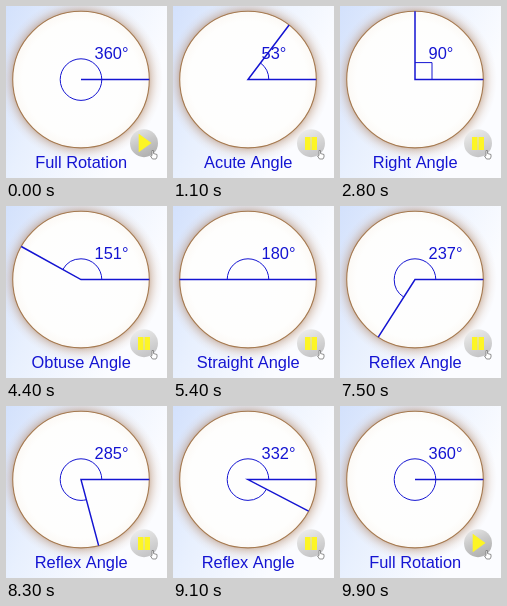
An HTML page with a canvas for the animation above (10000 ms loop, 161 by 172 pixels).

```html
<!DOCTYPE html>
<html lang="en">
<head>
<meta charset="utf-8">
<title>Types of angle</title>
<style>
html, body { margin: 0; width: 100%; height: 100%; overflow: hidden; background: #eef3fe; }
canvas { display: block; }
</style>
</head>
<body>
<canvas id="stage" width="161" height="172"></canvas>
<script>
const ctx = document.getElementById('stage').getContext('2d');
const LOOP = 10000, STEP = 100;
const CX = 75, CY = 73.6, RADIUS = 68.3, ARC = 20.8;
const BLUE = '#1414d2';

// [time, degrees]; equal neighbours are pauses
const KEYS = [[208, 0], [1723, 90], [3373, 90], [4888, 180], [6533, 180], [9563, 360]];

function angleAt(t) {
  if (t < KEYS[0][0]) return 360;
  for (let i = 1; i < KEYS.length; i++) {
    const [t0, a0] = KEYS[i - 1], [t1, a1] = KEYS[i];
    if (t < t1) return a0 + (a1 - a0) * (t - t0) / (t1 - t0);
  }
  return 360;
}

function nameOf(deg) {
  if (deg < 90) return 'Acute Angle';
  if (deg === 90) return 'Right Angle';
  if (deg < 180) return 'Obtuse Angle';
  if (deg === 180) return 'Straight Angle';
  return deg < 360 ? 'Reflex Angle' : 'Full Rotation';
}

function gradient(g, ...stops) {
  stops.forEach(([at, color]) => g.addColorStop(at, color));
  return g;
}

function disc(x, y, r, fill) {
  ctx.beginPath();
  ctx.arc(x, y, r, 0, Math.PI * 2);
  ctx.fillStyle = fill;
  ctx.fill();
}

function stroke(color, width) {
  ctx.strokeStyle = color;
  ctx.lineWidth = width;
  ctx.stroke();
}

function trace(points) {
  ctx.beginPath();
  points.forEach(([x, y]) => ctx.lineTo(x, y));
}

function drawBackdrop() {
  ctx.fillStyle = gradient(ctx.createLinearGradient(0, 0, 150, 70),
    [0, '#d3e1fc'], [0.45, '#e8f0fe'], [1, '#fbfcff']);
  ctx.fillRect(0, 0, 161, 172);
  disc(CX, CY, 82, gradient(ctx.createRadialGradient(CX, CY, 67, CX, CY, 82),
    [0, 'rgba(175,130,95,.6)'], [0.3, 'rgba(190,155,130,.36)'],
    [0.65, 'rgba(208,184,168,.14)'], [1, 'rgba(220,205,200,0)']));
  disc(CX, CY, RADIUS, gradient(ctx.createRadialGradient(CX, CY, 20, CX, CY, RADIUS),
    [0, '#fefefe'], [0.8, '#fefefd'], [1, '#fcf9f5']));
  stroke('#a5794f', 1.1);
}

function drawAngle(deg) {
  const rad = deg * Math.PI / 180;
  if (deg === 90) {
    trace([[CX, CY - 17], [CX + 17, CY - 17], [CX + 17, CY]]);
  } else {
    ctx.beginPath();
    ctx.arc(CX, CY, ARC, 0, -rad, true);
  }
  stroke(BLUE, 1);
  trace([[CX + RADIUS * Math.cos(rad), CY - RADIUS * Math.sin(rad)],
    [CX, CY], [CX + RADIUS, CY]]);
  stroke(BLUE, 1.5);
}

function drawText(deg) {
  ctx.font = '16.4px "Liberation Sans", Arial, sans-serif';
  ctx.fillStyle = BLUE;
  ctx.textAlign = 'left';
  ctx.fillText(Math.round(deg) + '°', 88.6, 53);
  ctx.textAlign = 'center';
  ctx.fillText(nameOf(deg), 75.2, 162.4);
}

function drawButton(stopped) {
  const x = 138, y = 137.2, r = 14;
  disc(x, y, r, gradient(ctx.createLinearGradient(x - 6, y - r, x + 6, y + r),
    ...(stopped
      ? [[0, '#e4e4e4'], [0.45, '#c8c8c8'], [1, '#aeaeae']]
      : [[0, '#ececec'], [0.45, '#d8d8d8'], [1, '#c2c2c4']])));
  ctx.fillStyle = '#fdf524';
  if (stopped) {
    trace([[132.7, 127.8], [145.5, 137], [132.7, 146.2]]);
    ctx.fill();
  } else {
    ctx.fillRect(132, 131, 5.5, 13);
    ctx.fillRect(138.5, 131, 5.5, 13);
  }
}

function drawHand() {
  trace([[146, 144.5], [147.5, 144.5], [147.5, 147.5], [151, 148.5], [151, 151],
    [150, 153], [146.5, 153], [144.5, 150], [146, 149.5]]);
  ctx.closePath();
  ctx.fillStyle = '#fff';
  ctx.fill();
  stroke('#777', 0.8);
}

function draw(now) {
  const t = Math.floor((now % LOOP) / STEP) * STEP;
  const deg = angleAt(t);
  drawBackdrop();
  drawAngle(deg);
  drawText(deg);
  drawButton(deg === 360);
  drawHand();
}

const start = performance.now();
function tick() {
  draw(performance.now() - start);
  requestAnimationFrame(tick);
}
tick();
</script>
</body>
</html>
```
